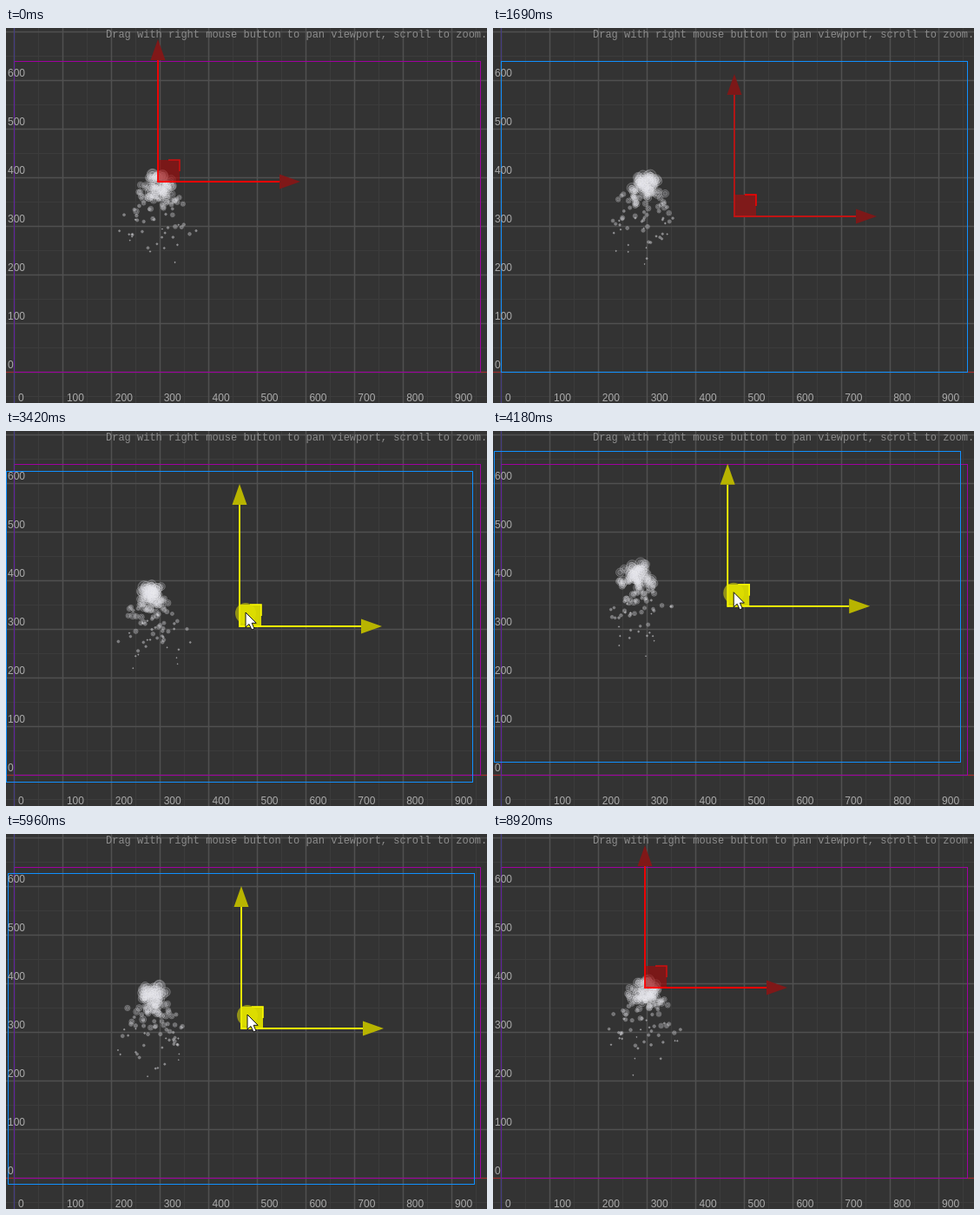
Animation of 554x432 px, one loop 8.99 s. Source, as an HTML page with a canvas:

```html
<!DOCTYPE html>
<html>
<head>
<meta charset="utf-8">
<style>
  html, body { margin: 0; width: 100%; height: 100%; overflow: hidden; background: #333; }
  canvas { display: block; }
</style>
</head>
<body>
<canvas id="stage" width="554" height="432"></canvas>
<script>
const ctx = document.getElementById('stage').getContext('2d');
const W = 554, H = 432, LOOP = 8990, UNIT = 56;
const LEFT = 9.5, TOP = 38.5, BOTTOM = 396.5, FRAME_W = 537, FRAME_H = 358;
const SANS = '12px "Liberation Sans", Arial, sans-serif';
const MONO = '12px "Liberation Mono", "Courier New", monospace';

const SELECT_ROOT = 1500, HOVER = 2750, DRAG = 2850, UNDO = 6110;
const TIP = 7200, SELECT_EMITTER = 7740;

const RUNS = [[0, 1690, 22], [1930, 3420, 19], [3420, 4960, 20], [4960, 5960, 13],
  [6110, 6430, 4], [6750, 6750, 0], [7200, 7200, 0], [7740, 8920, 15]];

// Drag offset: [time, x, y]
const PATH = [[2850, 0, 0], [3080, -18, 20], [3240, -25, 36], [3420, -9, 8], [3600, 10, -3],
  [3850, 18, 22], [4080, -5, -10], [4300, -20, -38], [4560, -24, 18], [4740, 5, 31],
  [4960, 27, -20], [5150, 0, -38], [5400, -28, 5], [5640, -14, -38], [5800, -24, -14], [5960, -7, 7]];

function refreshTime(t) {
  const [start, end, steps] = RUNS.filter(r => r[0] <= t).pop();
  if (t >= end) return end;
  const step = (end - start) / steps;
  return start + Math.floor((t - start) / step + 1e-6) * step;
}

function dragOffset(t) {
  if (t < DRAG || t >= UNDO) return [0, 0];
  const at = i => PATH[Math.max(0, Math.min(PATH.length - 1, i))];
  let i = 0;
  while (i < PATH.length - 2 && PATH[i + 1][0] <= t) i++;
  const a = at(i - 1), b = at(i), c = at(i + 1), d = at(i + 2);
  const u = Math.min(1, (t - b[0]) / (c[0] - b[0]));
  return [1, 2].map(k => b[k] + u / 2 * (c[k] - a[k] +
    u * (2 * a[k] - 5 * b[k] + 4 * c[k] - d[k] + u * (3 * (b[k] - c[k]) + d[k] - a[k]))));
}

function random(seed) {
  const s = Math.sin(seed * 12.9898 + 4.17) * 43758.5453;
  return s - Math.floor(s);
}

function line(x1, y1, x2, y2, color, width = 1) {
  ctx.strokeStyle = color;
  ctx.lineWidth = width;
  ctx.beginPath();
  ctx.moveTo(x1, y1);
  ctx.lineTo(x2, y2);
  ctx.stroke();
}

function polygon(points, fill) {
  ctx.fillStyle = fill;
  ctx.beginPath();
  points.forEach(([x, y]) => ctx.lineTo(x, y));
  ctx.closePath();
  ctx.fill();
}

function circle(x, y, r) {
  ctx.beginPath();
  ctx.arc(x, y, r, 0, Math.PI * 2);
}

function text(str, x, y, color, font = SANS) {
  ctx.font = font;
  ctx.fillStyle = color;
  ctx.fillText(str, x, y);
}

function frame(x, y, color) {
  ctx.strokeStyle = color;
  ctx.lineWidth = 1;
  ctx.strokeRect(Math.round(x) + LEFT, Math.round(y) + TOP, FRAME_W, FRAME_H);
}

function grid() {
  ctx.fillStyle = '#333';
  ctx.fillRect(0, 0, W, H);
  for (const [shift, color, width] of [[UNIT / 2, '#3c3c3c', 1], [0, '#505050', 1.5]]) {
    for (let x = LEFT + shift; x < W; x += UNIT) line(x, 0, x, H, color, width);
    for (let y = BOTTOM + UNIT - shift; y > 0; y -= UNIT) line(0, y, W, y, color, width);
  }
  line(0, BOTTOM, W, BOTTOM, '#a02a2a');
}

function labels() {
  for (let i = 0; i < 10; i++) text(i * 100, LEFT + 4.5 + i * 55.9, 430, '#aaa');
  for (let i = 0; i < 8; i++) text(i * 100, 2, BOTTOM - 4.5 - i * UNIT, '#aaa');
  text('Drag with right mouse button to pan viewport, scroll to zoom.', 115, 11, '#8c8c8c', MONO);
}

function particles(t, cx, cy) {
  const COUNT = 125, CYCLES = 9, life = LOOP / CYCLES;
  ctx.lineWidth = 0.8;
  for (let i = 0; i < COUNT; i++) {
    const age = t / life + i / COUNT, u = age % 1;
    const seed = i * 7 + (Math.floor(age) % CYCLES) * 1013;
    const angle = random(seed) * Math.PI * 2, speed = Math.sqrt(random(seed + 1));
    const x = cx + (random(seed + 2) - 0.5) * 18 + Math.cos(angle) * speed * 46 * u;
    const y = cy + (random(seed + 3) - 0.5) * 18 + Math.sin(angle) * speed * 28 * u + 72 * u * u;
    const r = 0.5 + 6 * (1 - u) * (0.8 + 0.3 * random(seed + 4));
    ctx.fillStyle = 'rgba(235,235,240,.13)';
    ctx.strokeStyle = 'rgba(235,235,240,.34)';
    circle(x, y, r);
    ctx.fill();
    ctx.stroke();
    circle(x, y, r * 0.55);
    ctx.fill();
    ctx.stroke();
  }
}

function gizmo(x, y, [stem, head, plane, corner]) {
  polygon([[x, y], [x, y - 25], [x + 25, y - 25], [x + 25, y]], plane);
  ctx.strokeStyle = corner;
  ctx.lineWidth = 1.5;
  ctx.beginPath();
  ctx.moveTo(x + 12, y - 25);
  ctx.lineTo(x + 25, y - 25);
  ctx.lineTo(x + 25, y - 12);
  ctx.stroke();
  line(x, y + 1, x, y - 140, stem, 1.8);
  line(x, y, x + 140, y, stem, 1.8);
  polygon([[x - 8.5, y - 140], [x, y - 164], [x + 8.5, y - 140]], head);
  polygon([[x + 140, y - 8.5], [x + 164, y], [x + 140, y + 8.5]], head);
}

function cursor(x, y) {
  const shape = [[0, 0], [0, 17], [4, 13.5], [7, 20], [10, 18.7], [7.2, 12.3], [12.2, 12.3]];
  polygon(shape.map(([px, py]) => [x + px, y + py]), '#fff');
  ctx.strokeStyle = '#111';
  ctx.lineWidth = 1;
  ctx.stroke();
}

function tooltip() {
  ctx.fillStyle = '#8e8e8e';
  ctx.fillRect(174, 162, 69, 15);
  text('New Node', 180, 173, '#222');
}

const BRIGHT_RED = ['#f00', '#801818', 'rgba(160,10,10,.65)', '#d01010'];
const RED = ['#c01414', '#7c1818', '#7f1a1a', '#f00'];
const YELLOW = ['#ff0', '#b8b400', '#d4d400', '#ff0'];

function draw(now) {
  const t = refreshTime(now % LOOP);
  const [dx, dy] = dragOffset(t);
  const rootSelected = t >= SELECT_ROOT && t < SELECT_EMITTER;
  const active = t >= HOVER && t < UNDO;

  grid();
  frame(0, 0, '#a000a0');
  line(LEFT, 0, LEFT, H, 'rgba(64,50,160,.65)');
  if (rootSelected) frame(dx, dy, '#1090ff');
  particles(t, 175.5 + dx, 177 + dy);
  labels();

  if (!rootSelected) gizmo(175, 177, BRIGHT_RED);
  else gizmo(278 + dx, 217 + dy, active ? YELLOW : RED);

  if (active) {
    circle(285 + dx, 202 + dy, 12);
    ctx.fillStyle = 'rgba(225,225,0,.55)';
    ctx.fill();
  }
  if (t >= 2400 && t < UNDO) {
    const away = Math.max(0, (HOVER - t) / 350) ** 2;
    cursor(285 + dx + 270 * away, 201 + dy + 30 * away);
  }
  if (t >= TIP && t < SELECT_EMITTER) tooltip();
}

const begin = performance.now();
function tick() {
  draw(performance.now() - begin);
  requestAnimationFrame(tick);
}
tick();
</script>
</body>
</html>
```
